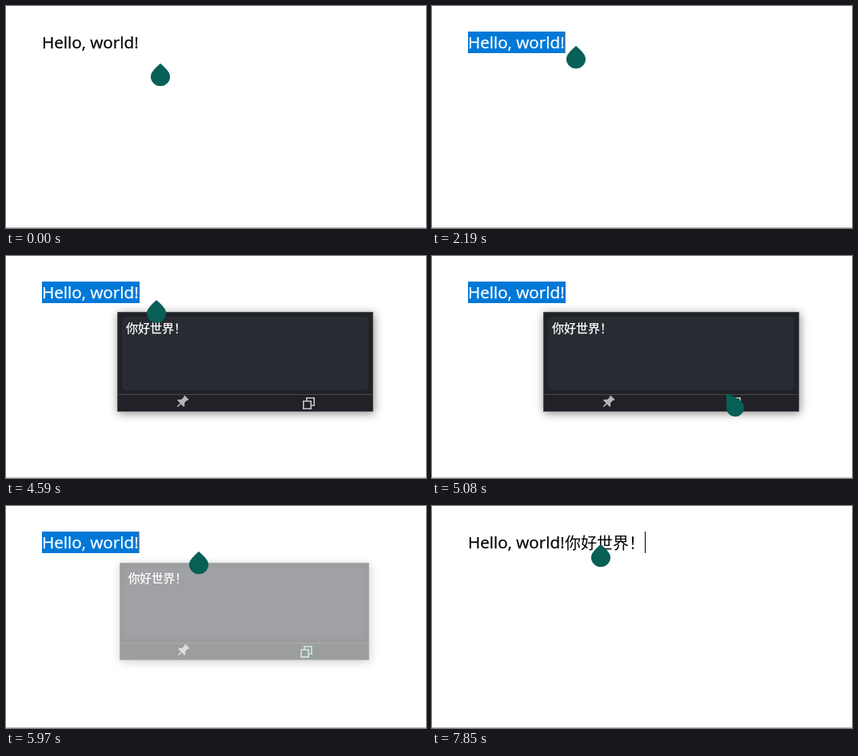
These frames come from a looping animation (525x278 px, 8000 ms). An HTML page:

```html
<!DOCTYPE html>
<html lang="en">
<head>
<meta charset="utf-8">
<title>Select, translate, paste</title>
<style>
  html, body { margin: 0; width: 525px; height: 278px; overflow: hidden; background: #fff; }
  svg { display: block; }
  .latin { font: 20.7px "Open Sans", "Noto Sans", sans-serif; stroke-width: .25px; }
  .han { font: 300 20px "Noto Sans CJK SC", "Noto Sans CJK", sans-serif; }
  .result { font: 500 15px "Open Sans", "Noto Sans CJK SC", "Noto Sans CJK", sans-serif; }
  .dark { fill: #000; stroke: #000; }
  .light { fill: #fff; stroke: #fff; stroke-width: .25px; }
  .panel { filter: drop-shadow(1px 2px 6px #0007); }
  .drop { fill: #075f56; filter: drop-shadow(0 .5px .5px #0004); }
</style>
</head>
<body>
<svg width="525" height="278">
  <rect y="277" width="525" height="1" fill="#bebebe"/>
  <text id="line" class="latin dark" x="45" y="53">Hello, world!</text>
  <text id="pasted" class="han" x="166" y="53.5">你好世界！</text>
  <svg id="selection" x="45" y="32" height="27">
    <rect width="130" height="27" fill="#0078d7"/>
    <text class="latin light" y="21">Hello, world!</text>
  </svg>
  <rect id="caret" y="32" width="1" height="27"/>

  <g id="popup">
    <rect class="panel" x="139" y="70" width="320" height="125" fill="#202227"/>
    <rect x="139.5" y="70.5" width="319" height="124" fill="none" stroke="#4a4c50"/>
    <rect x="145" y="76" width="308" height="92" rx="5" fill="#282b32"/>
    <path d="M140 173.5H458" stroke="#47494d"/>
    <text id="result" class="result light" x="150" y="96"></text>
    <path transform="translate(220.5 182.5) rotate(45) scale(.95)" fill="#b4b6ba"
      d="M-4-8H4V-6.5L3-6V-1L6 2V3.5H.8V9L0 10-.8 9V3.5H-6V2L-3-1V-6L-4-6.5Z"/>
    <path id="copy" fill="none" stroke-width="1.6" d="M371.8 181.8h9.4v9.4h-9.4zM375.8 181V177.8h9.4v9.4H382"/>
  </g>

  <g id="pointer">
    <circle id="press" r="15" fill="#ff0" fill-opacity=".47"/>
    <path id="arrow" class="drop" d="M0 0C4 4 12 10 12 16.2A12 12 0 0 1-12 16.2C-12 10-4 4 0 0Z"/>
    <path id="hand" class="drop" d="M0 0V18A11 11 0 1 0 16 8.2Q8 3 0 0Z"/>
  </g>
</svg>
<script>
const LOOP = 8000, STEP = 70, BLINK = 530;
const $ = id => document.getElementById(id);
const between = (t, a, b) => t >= a && t < b;
const clamp = k => Math.min(1, Math.max(0, k));
const smooth = k => k * k * (3 - 2 * k);
const show = (id, on) => $(id).setAttribute("visibility", on ? "visible" : "hidden");

// Key moments of the story
const press = 1510, release = 2190, open = 3120, translated = 4260;
const copy = 5550, close = 5830, deselect = 6390, paste = 7850;

const home = { x: 193, y: 72 };
const moves = [
  { start: 330, end: 680, x: 111, y: 50 },
  { start: 810, end: 1300, x: 36, y: 46 },
  { start: 1440, end: 1920, x: 180, y: 50 },
  { start: 4520, end: 5080, x: 368, y: 172 },
  { start: 5080, end: 5290, x: 378, y: 186 },
  { start: 5480, end: 5970, x: 241, y: 57 },
  { start: 5970, end: 6320, x: 211, y: 48 }
];

// Each move is eased, and shown in discrete steps.
function pointerAt(t) {
  let { x, y } = home;
  for (const m of moves) {
    if (t < m.start) break;
    const elapsed = Math.floor((t - m.start) / STEP) * STEP;
    const k = smooth(clamp(elapsed / (m.end - m.start)));
    x += (m.x - x) * k;
    y += (m.y - y) * k;
  }
  return [x, y];
}

// Nearest character boundary to x
function boundary(x) {
  const line = $("line");
  let best = 45;
  for (let i = 0; i < line.getNumberOfChars(); i++) {
    const end = line.getEndPositionOfChar(i).x;
    if (Math.abs(end - x) < Math.abs(best - x)) best = end;
  }
  return Math.round(best);
}

// The blink restarts whenever the caret is placed or regains focus.
function caretOn(t) {
  if (between(t, open, close + STEP)) return false;
  const restart = [-660, 1930, close + STEP, deselect].findLast(r => r <= t);
  return Math.floor((t - restart) / BLINK) % 2 === 0;
}

function draw(t) {
  const [x, y] = pointerAt(t);
  const selected = between(t, press, deselect), pasted = t >= paste;
  const edge = between(t, press, release) ? boundary(x) : 166;

  show("selection", selected && edge > 45);
  $("selection").setAttribute("width", edge - 44);
  show("pasted", pasted);
  show("caret", caretOn(t));
  $("caret").setAttribute("x", pasted ? 266 : edge);
  $("caret").setAttribute("fill", selected ? "#ff8c20" : "#000");

  const closing = clamp(Math.floor((t - close) / STEP) * STEP / 250);
  show("popup", between(t, open, close + 3 * STEP));
  $("popup").setAttribute("opacity", 1 - closing);
  $("popup").setAttribute("transform",
    `translate(259 110) scale(${1 - closing * 0.045}) translate(-259 -110)`);
  $("result").textContent = t < translated ? "翻译中..." : "你好世界！";
  $("copy").setAttribute("stroke", t < copy + STEP ? "#c4c6c9" : "#90d8a0");

  const overButton = between(t, open, close) && y > 170;
  $("pointer").setAttribute("transform", `translate(${x} ${y})`);
  show("press", between(t, press, release) || between(t, copy, copy + 2 * STEP)
    || between(t, deselect, deselect + STEP));
  show("arrow", !overButton);
  show("hand", overButton);
}

const origin = performance.now();
function tick() {
  draw((performance.now() - origin) % LOOP);
  requestAnimationFrame(tick);
}
tick();
</script>
</body>
</html>
```
